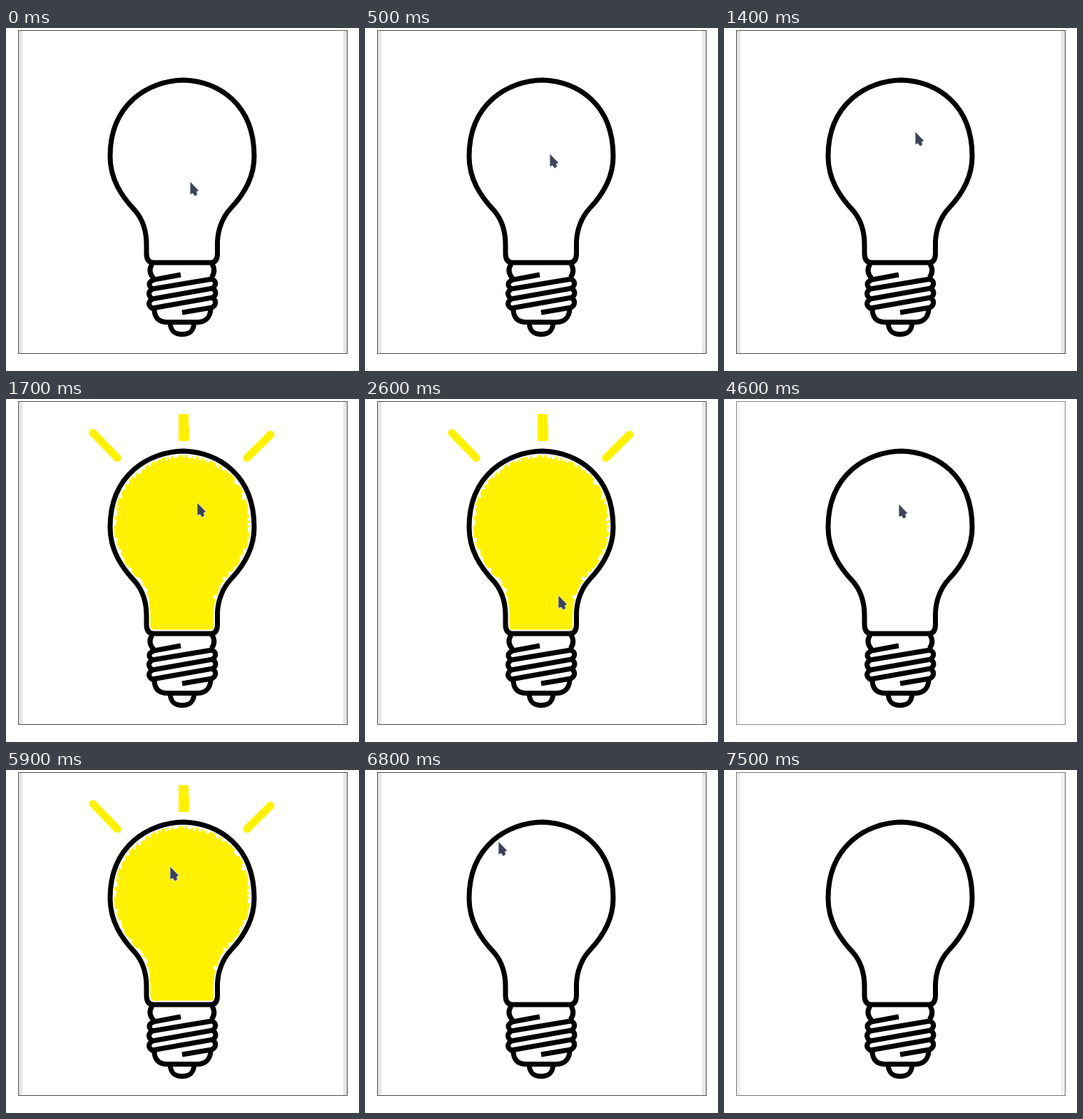
An HTML page that plays this animation: 495 by 481 pixels, repeating every 8.6 s.

```html
<!DOCTYPE html>
<html lang="en">
<head>
<meta charset="utf-8">
<title>Light bulb button</title>
<style>
  html, body { margin: 0; width: 100%; height: 100%; overflow: hidden; background: #fff; }
  svg { display: block; }
  .line { fill: none; stroke: #000; stroke-width: 7; }
  #button { fill: #efefef; stroke: #767676; }
  #button.hover { fill: #e5e5e5; stroke: #4f4f4f; }
  #button.press { fill: #f5f5f5; stroke: #8d8d8d; }
</style>
</head>
<body>
<svg width="495" height="481" viewBox="0 0 495 481">
  <defs>
    <path id="glass" d="M249 73C200 74 146 106 146 180C146 212 162 236 181 256C193 270 197 288 197 304V316Q197 329 207 329H287Q296.500 329 296.500 316V300C297 284 303 266 315 253C334 233 348 210 348 180C348 106 298 75 249 73Z"/>
    <clipPath id="inside"><use href="#glass"/></clipPath>
  </defs>

  <rect id="button" x="17.5" y="3.5" width="461" height="453"/>
  <rect x="23" y="4" width="450" height="452" fill="#fff"/>

  <g id="light">
    <g clip-path="url(#inside)">
      <use href="#glass" fill="#fff200" stroke="#fff" stroke-width="11"/>
      <path id="flecks" fill="#fff"/>
    </g>
    <g fill="#fff200" stroke="#fff200" stroke-linejoin="round">
      <path d="M244 23H254V38L255 39V57H244Z" stroke-width="4"/>
      <path d="M122 47.500L156 82.500M371 50L338 82.500" stroke-width="11" stroke-linecap="round"/>
    </g>
  </g>

  <use href="#glass" class="line"/>
  <g class="line">
    <path d="M205 331Q198 341 207 351M289 331Q295 341 288 350"/>
    <path d="M245 346L207 353Q196 358 205 366L289 352Q298 357 290 365L205 380Q196 372 205 366"/>
    <path d="M205 380Q196 387 205 393L290 378Q298 372 290 365M290 378Q298 386 289 392L247 399"/>
    <path d="M208 394C208 406 214 412.500 226 412.500H268C280 412.500 287 405 287 393"/>
    <path d="M230 413C231 425 236 429.500 247 429.500C258 429.500 263 425 264 413"/>
  </g>

  <path id="cursor" d="M.5 0V17L4 15.500L7 19.500L10 17.500L9 13.500L12 12Z" fill="#3d4357" stroke="#dfe1e8" stroke-width="1.500" paint-order="stroke"/>
</svg>
<script>
const LOOP = 8600;
const STEP = 100;
const $ = id => document.getElementById(id);

// The button is held for one step per click; each release toggles the light.
const clicks = [100, 300, 1500, 3700, 4600, 6600];

// Hand movements: start, steps, and where the pointer comes to rest.
const home = { x: 258, y: 216 };
const strokes = [
  { start: 100, steps: 5, x: 259, y: 177 },
  { start: 800, steps: 2, x: 268, y: 140 },
  { start: 1400, steps: 1, x: 268, y: 146 },
  { start: 1900, steps: 8, x: 271, y: 276 },
  { start: 3300, steps: 3, x: 245, y: 148 },
  { start: 5900, steps: 3, x: 187, y: 101 },
  { start: 7200, steps: 4, x: 205, y: -40 }
];

const ease = p => p * p * (3 - 2 * p);

function pointerAt(t) {
  let { x, y } = home;
  for (const s of strokes) {
    if (t < s.start) break;
    const done = Math.floor((t - s.start) / STEP) + 1;
    const p = ease(Math.min(1, done / s.steps));
    x += (s.x - x) * p;
    y += (s.y - y) * p;
  }
  return { x, y };
}

// Ragged edge: seeded blocks scattered just inside the outline.
function addFlecks() {
  const glass = $('glass');
  const length = glass.getTotalLength();
  let seed = 11;
  const random = () => (seed = seed * 16807 % 2147483647) / 2147483647;
  let d = '';
  for (let i = 0; i < 200; i++) {
    const along = random() * (length - 2);
    const a = glass.getPointAtLength(along);
    const b = glass.getPointAtLength(along + 1);
    const depth = 4 + random() * 4;
    const size = 1 + Math.round(random() * 3);
    if (a.y > 285) continue;
    const x = Math.round(a.x + (b.y - a.y) * depth * -1 - size / 2);
    const y = Math.round(a.y + (b.x - a.x) * depth - size / 2);
    const inX = Math.round(2 * a.x - x - size);
    const inY = Math.round(2 * a.y - y - size);
    d += `M${inX} ${inY}h${size}v${size + 1}h${-size}z`;
  }
  $('flecks').setAttribute('d', d);
}

function draw(t) {
  const { x, y } = pointerAt(t);
  const pressed = clicks.some(c => t >= c && t < c + STEP);
  const lit = clicks.filter(c => t >= c + STEP).length % 2;
  $('button').setAttribute('class', pressed ? 'press' : y > 3 ? 'hover' : '');
  $('light').style.display = lit ? '' : 'none';
  $('cursor').setAttribute('transform', `translate(${Math.round(x)} ${Math.round(y)})`);
}

addFlecks();
const start = performance.now();
function tick() {
  draw((performance.now() - start) % LOOP);
  requestAnimationFrame(tick);
}
tick();
</script>
</body>
</html>
```
